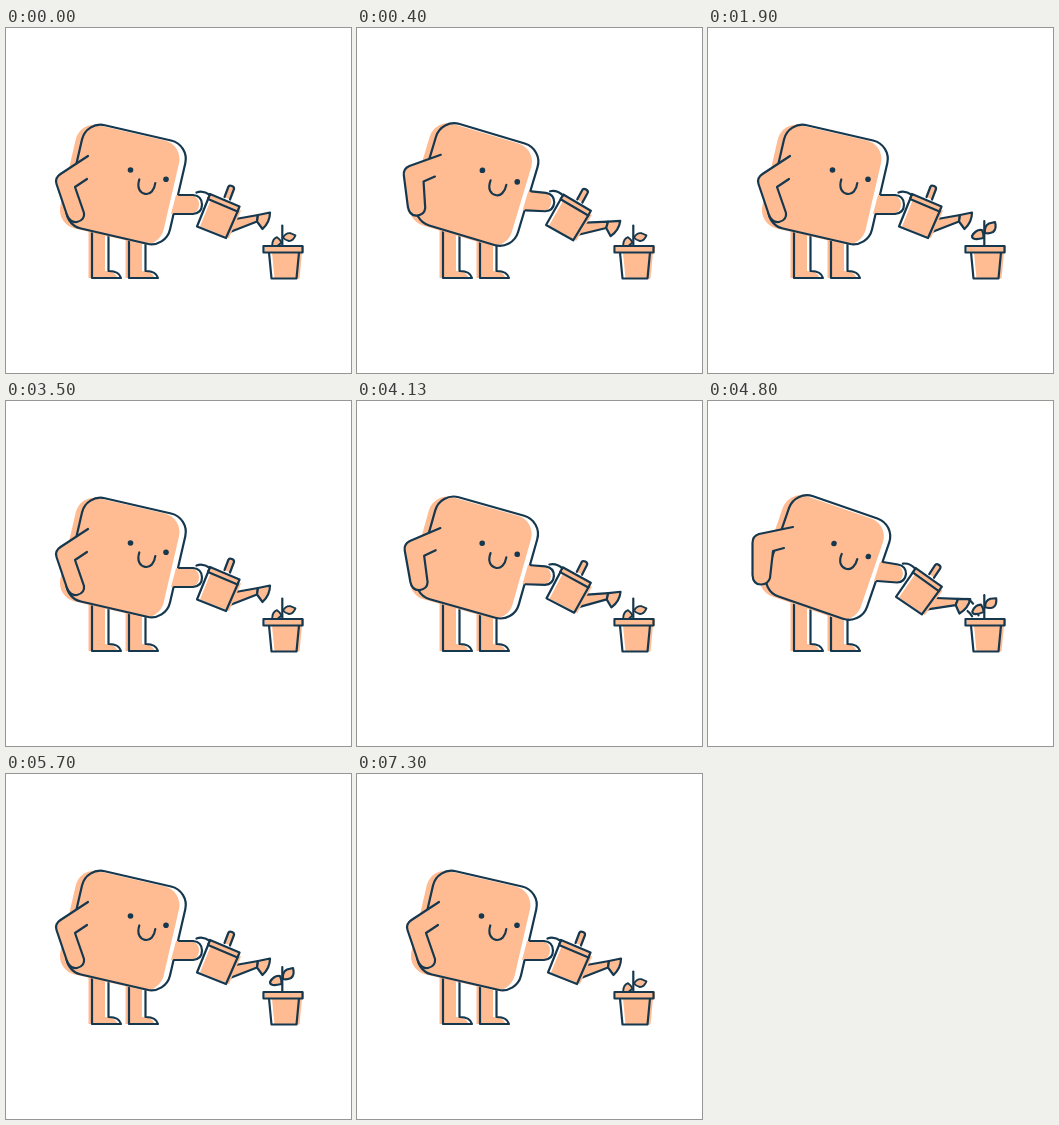
Animation of 345x345 px, one loop 7.61 s. Source, as an HTML page:

```html
<!DOCTYPE html>
<html lang="en">
<head>
<meta charset="utf-8">
<title>Watering the plant</title>
<style>
  html, body { margin: 0; width: 100%; height: 100%; overflow: hidden; background: #fff; }
  svg { display: block; width: 100vw; height: 100vh; }
  .fill { fill: #ffbb91; }
  .line { fill: none; stroke: #16384e; stroke-width: 2.2; stroke-linecap: round; stroke-linejoin: round; }
  .dot { fill: #16384e; }
</style>
</head>
<body>
<svg id="stage" viewBox="0 0 345 345"></svg>
<script>
const LOOP = 7610, CYCLE = 3800;
const stage = document.getElementById('stage');

function add(tag, attrs, parent = stage) {
  const el = document.createElementNS('http://www.w3.org/2000/svg', tag);
  for (const name in attrs) el.setAttribute(name, attrs[name]);
  return parent.appendChild(el);
}
const group = (parent, attrs = {}) => add('g', attrs, parent);
const line = (d, parent) => add('path', { class: 'line', d }, parent);

// A fill printed slightly off its outline.
function shape(d, dx, dy, parent) {
  const fill = add('path', { class: 'fill', d, transform: `translate(${dx} ${dy})` }, parent);
  return [fill, line(d, parent)];
}

const clamp = x => Math.min(1, Math.max(0, x));
const ease = x => 0.5 - 0.5 * Math.cos(Math.PI * x);
const ramp = (t, from, to) => ease(clamp((t - from) / (to - from)));

function mix(a, b, k) {
  const ends = b.match(/[\d.]+/g);
  let i = 0;
  return a.replace(/[\d.]+/g, n => (+n + (ends[i++] - n) * k).toFixed(2));
}

// Legs
for (const [x, top] of [[86, 202], [123, 212]]) {
  shape(`M${x} ${top}V250H${x + 29}Q${x + 27} 243 ${x + 17} 243H${x + 16.5}V${top + 4}`, -3.5, 0, stage);
}

// Body and face
const square = { x: -53, y: -53, width: 106, height: 106, rx: 19 };
const bodyFill = add('rect', { class: 'fill', ...square });
const body = group(stage);
add('rect', { class: 'line', ...square }, body);
const face = group(body, { transform: 'rotate(-13) translate(-120 -156.5)' });
for (const [cx, cy] of [[124.5, 142], [160, 151.3]]) add('circle', { class: 'dot', cx, cy, r: 2.8 }, face);
line('M133.3 151.5C130.5 160.5 134.5 165 139 165.8C144.3 167 148.5 162 149.3 155', face);

// Arms: resting and pouring poses
const arms = [
  {
    rest: 'M82 128L54.5 146Q48.5 150 50.5 156L61 187Q64 195 71 194Q79 192 78 185L69 159L81 151',
    pour: 'M85 126L51 133Q44.5 135 44.5 142L44.5 174Q45 183.5 53 183.5Q60 183.5 62 177L65 150L76 147',
    offset: [0, 0]
  },
  {
    rest: 'M173 167L187 167Q196 168 196 176.5Q196 185 187 186L168 186',
    pour: 'M175 161L190 163.5Q198 165 198 173Q197 181 189 181.5L169 180',
    offset: [-3, 0]
  }
];
for (const arm of arms) arm.parts = shape(arm.rest, ...arm.offset, stage);

// Watering can
const can = group(stage);
shape('M224 192L252 187L251 193.5L221.5 205', 1, 0, can);
shape('M252 187L264 184.5Q264 194 256.5 201L251 193.5Z', 0, 0, can);
shape('M218.5 169L222.5 158.5Q223.5 157 226 158Q228.5 159 228 161L224 171.5', 0, 0, can);
shape('M202.5 170L232 182.5L220 210L191 198.5Z', 3, 0, can);
shape('M204 166L233.5 178.5L231.5 183.5L202 171Z', 1, 0, can);
line('M190.5 164.5Q197 162 204 167', can);

// Water
const drops = ['M260 198Q267 202 271 216', 'M258 209Q262 211 265 217'].map(d => line(d, stage));

// Plant, hidden below the rim by a clip
const clip = add('clipPath', { id: 'above' }, add('defs', {}));
add('rect', { x: 240, y: 180, width: 70, height: 37 }, clip);
const plant = group(group(stage, { 'clip-path': 'url(#above)' }));
line('M276.3 193V224', plant);
const leaves = [
  { x: 277, y: 205, turn: 38, d: 'M277 205Q276 198 281 195.5L287 194Q289 201 285 204Q281 206 277 205Z' },
  { x: 275.5, y: 210, turn: -30, d: 'M275.5 210Q264 213 264 208Q268 201 274 202Q276 206 275.5 210Z' }
];
for (const leaf of leaves) {
  leaf.el = group(plant);
  shape(leaf.d, 0.5, 0, leaf.el);
}

// Pot
shape('M263 224.5L265.5 250.5H290.5L293 224.5', 3, 0, stage);
shape('M257.5 218H296.5V224.5H257.5Z', 1.5, 0, stage);

function draw(t) {
  const tilt = ramp(t, 0, 700) - ramp(t, 1200, 1900);
  const grown = ramp(t, 600, 1200) - ramp(t, 2767, 3500);
  const low = 1 - grown;

  const angle = 13 + 6 * tilt;
  bodyFill.setAttribute('transform', `translate(113.7 156.5) rotate(${angle})`);
  body.setAttribute('transform', `translate(120 156.5) rotate(${angle})`);

  for (const arm of arms) {
    const d = mix(arm.rest, arm.pour, tilt);
    for (const part of arm.parts) part.setAttribute('d', d);
  }
  can.setAttribute('transform', `translate(${-1.4 * tilt} ${2 * tilt}) rotate(${12.5 * tilt} 211 189)`);

  const pouring = t > 550 && t < 1300;
  drops.forEach((drop, i) => {
    drop.style.display = pouring ? '' : 'none';
    drop.style.strokeDasharray = '7 6';
    drop.style.strokeDashoffset = -((t - 1000) * 0.045 + i * 2);
  });

  plant.setAttribute('transform', `translate(0 ${4.5 * low})`);
  for (const { el, x, y, turn } of leaves) {
    el.setAttribute('transform',
      `translate(${x} ${y}) rotate(${turn * low}) scale(${1 - 0.15 * low}) translate(${-x} ${-y})`);
  }
}

// The picture holds at uneven steps: 30 ms, then 70 ms.
function stepTime(t) {
  if (t >= 2 * CYCLE) return 0;
  const local = t % CYCLE;
  const base = Math.floor(local / 100) * 100;
  return local - base >= 30 ? base + 33 : base;
}

const start = performance.now();
function tick() {
  draw(stepTime((performance.now() - start) % LOOP));
  requestAnimationFrame(tick);
}
tick();
</script>
</body>
</html>
```
